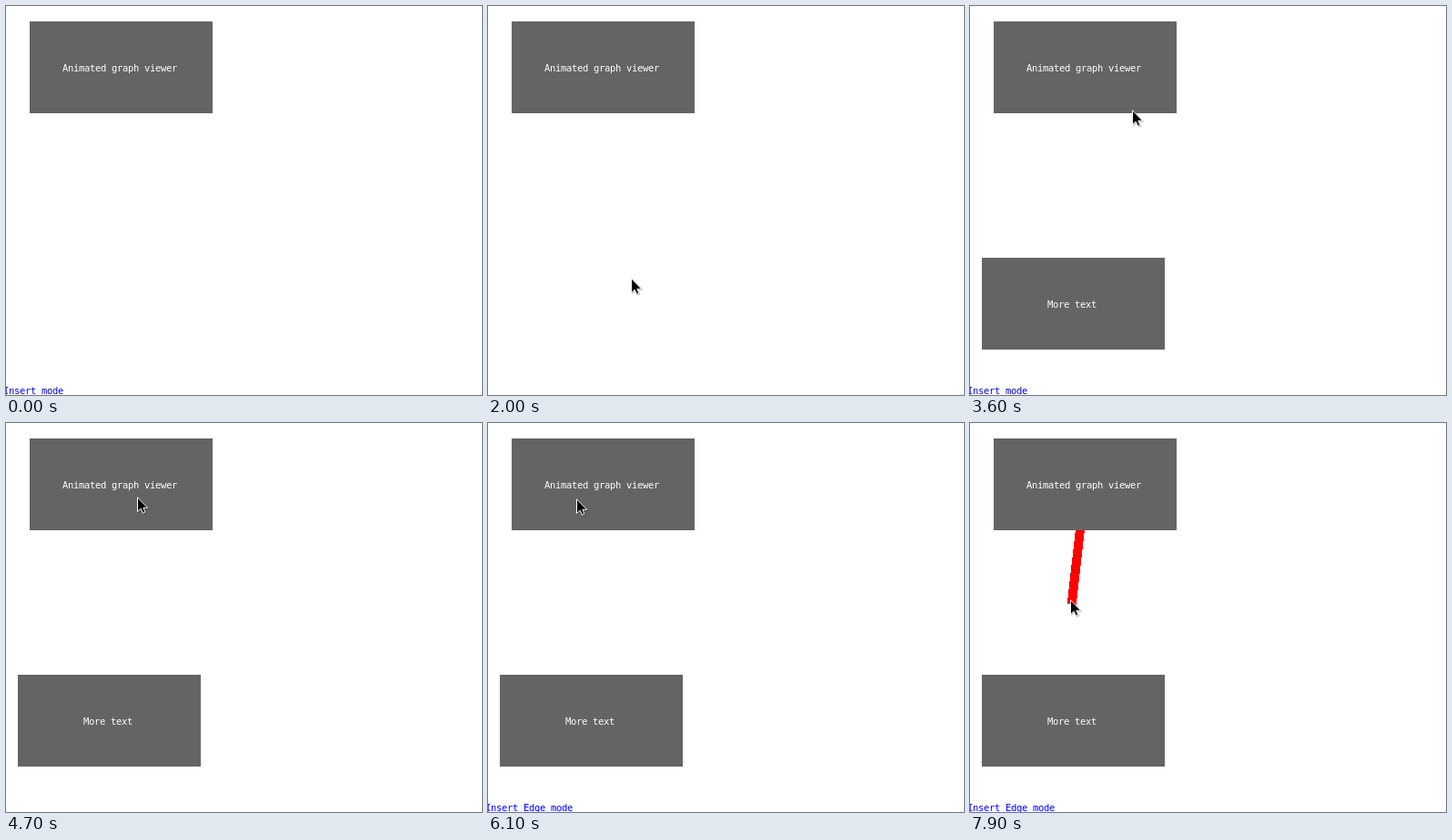
Write an HTML page that moves like this. It is 523 px wide and 428 px high and loops after 8 s.

```html
<!DOCTYPE html>
<html lang="en">
<head>
<meta charset="utf-8">
<title>Animated graph viewer</title>
<style>
  html, body { margin: 0; width: 100%; height: 100%; overflow: hidden; background: #fff; }
  svg { display: block; width: 523px; height: 428px; }
  text { font: 10.5px "DejaVu Sans Mono", monospace; letter-spacing: -0.32px; white-space: pre; }
  .node rect { fill: #646464; }
  .node text { fill: #fff; }
  #mode { fill: #00f; }
  #edge { stroke: #f00; stroke-width: 10; shape-rendering: crispEdges; }
</style>
</head>
<body>
<svg viewBox="0 0 523 428">
  <line id="edge" x1="126.5" y1="67.5"/>
  <g class="node">
    <rect x="26" y="17" width="201" height="101"/>
    <text x="62" y="72">Animated graph viewer</text>
  </g>
  <g class="node" id="second">
    <rect x="13" y="277" width="201" height="101"/>
    <text x="85" y="332">More text</text>
  </g>
  <text id="mode" x="-3" y="427"></text>
  <g id="cursor">
    <use href="#arrow" x="1" y="1" opacity=".25" stroke="#000"/>
    <path id="arrow" d="M.5 .8V16.5L4.2 13.2L6.4 18.2L8.9 17.1L6.8 12.3H11.6Z"/>
    <use href="#arrow" stroke="#fff"/>
  </g>
</svg>
<script>
const LOOP = 8000, STEP = 100;
const $ = id => document.getElementById(id);
const smooth = p => p * p * (3 - 2 * p);

// Pointer strokes: start time, number of steps, end x, end y, sideways bow
const moves = [
  [100, 2, 155, 177], [400, 5, 106, 318],
  [1000, 3, 83, 338], [1400, 3, 107, 327],
  [1800, 3, 157, 299], [2100, 2, 122, 310],
  [2600, 4, 251, 213], [3600, 1, 178, 114], [3700, 1, 171, 105],
  [4000, 2, 161, 105], [4500, 3, 144, 81],
  [4900, 7, 80, 87, 6], [5800, 4, 97, 83],
  [7000, 10, 110, 194, 8]
];

function pointer(t) {
  let x = 251, y = 165;
  for (const [start, steps, endX, endY, bow = 0] of moves) {
    if (t < start) break;
    const p = smooth(Math.min(1, ((t - start) / STEP + 1) / steps));
    const dx = endX - x, dy = endY - y;
    const side = bow * Math.sin(Math.PI * p) / Math.hypot(dx, dy);
    x += dx * p - dy * side;
    y += dy * p + dx * side;
  }
  return [Math.round(x), Math.round(y)];
}

// The mode line is blank while switching modes
const blanks = [[1900, 2100], [4600, 5200], [6300, 6400]];

function modeText(t) {
  if (blanks.some(([from, to]) => t >= from && t < to)) return "";
  return t < 5200 ? "Insert mode" : "Insert Edge mode";
}

const show = (id, on) => $(id).setAttribute("visibility", on ? "visible" : "hidden");

function draw(time) {
  const t = Math.floor(time % LOOP / STEP) * STEP;
  const [x, y] = pointer(t);
  $("cursor").setAttribute("transform", `translate(${x} ${y})`);
  $("edge").setAttribute("x2", x + 1.8);
  $("edge").setAttribute("y2", y + 5);
  $("mode").textContent = modeText(t);
  show("cursor", t >= 100);
  show("second", t >= 2400);
  show("edge", t >= 7000);
}

const begin = performance.now();
function tick() {
  draw(performance.now() - begin);
  requestAnimationFrame(tick);
}
tick();
</script>
</body>
</html>
```
